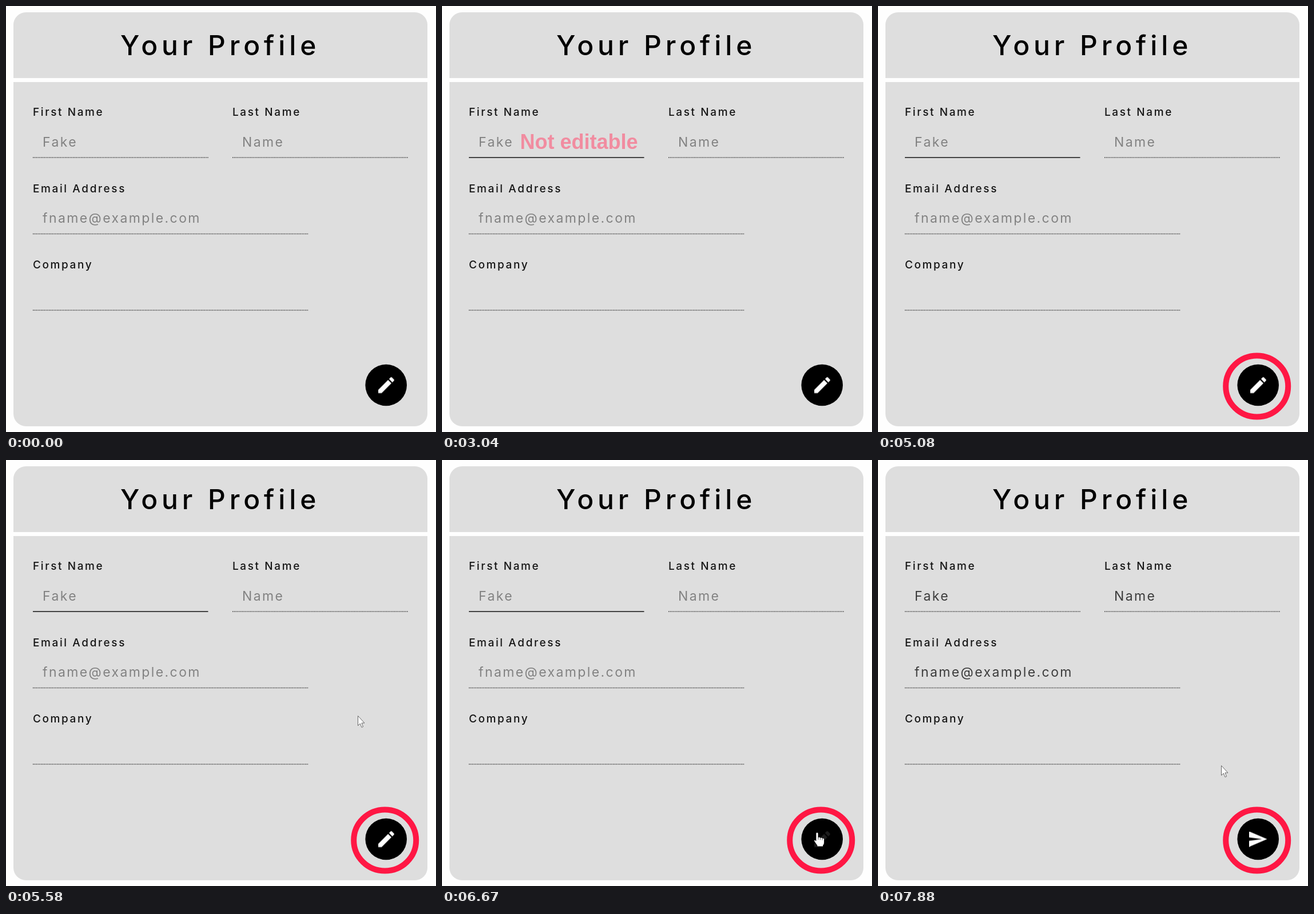
These frames come from a looping animation (752 px wide and 745 px high, 8 s). An HTML page:

```html
<!DOCTYPE html>
<html lang="en">
<head>
<meta charset="utf-8">
<title>Profile form</title>
<style>
  html, body { margin: 0; width: 100%; height: 100%; overflow: hidden; background: #fefefe; }
  svg { display: block; width: 752px; height: 745px; font-family: Inter, "Open Sans", sans-serif; }

  .card { fill: #dedede; }
  .title { font-size: 48px; font-weight: 500; letter-spacing: 6.9px; }
  .label { font-size: 19px; font-weight: 500; letter-spacing: 2.6px; fill: #151515; }
  .value { font-size: 23px; letter-spacing: 2.4px; fill: #828282; }
  .note { font: bold 36px "Liberation Sans", Arial, sans-serif; fill: #f18ca0; }
  .rule { stroke: #333; stroke-width: 1.6; stroke-dasharray: 1.4 1.4; }
  .focus { stroke: #444; stroke-width: 2; }
  .icon { fill: #fff; }

  /* Hard switches: every animated part shares one 8 s loop. */
  .switch { animation: 8s step-end infinite; }
  .note { animation-name: note; }
  .selection { animation-name: selection; }
  .focus { animation-name: focus; }
  .ring { animation-name: ring; }
  .edit { animation-name: edit; }
  .send { animation-name: send; }
  .arrow { animation-name: arrow; }
  .hand { animation-name: hand; }
  .value.switch { animation-name: enable; }
  .pointer { animation: move 8s linear infinite; }

  @keyframes note { 0%, 62% { opacity: 0 } 38% { opacity: 1 } }
  @keyframes selection { 0%, 58.875% { opacity: 0 } 51.625% { opacity: 1 } }
  @keyframes focus { 0%, 84.875% { opacity: 0 } 38% { opacity: 1 } }
  @keyframes ring { 0% { opacity: 0 } 62%, 100% { opacity: 1 } }
  @keyframes edit { 0% { opacity: 1 } 83.375% { opacity: .12 } 84.875%, 100% { opacity: 0 } }
  @keyframes send { 0% { opacity: 0 } 84.875% { opacity: .5 } 86.5%, 100% { opacity: 1 } }
  @keyframes enable { 0% { fill: #828282 } 84.875%, 100% { fill: #3c3c3c } }
  @keyframes arrow {
    0%, 31.75%, 79% { opacity: 0 }
    22.875%, 65.1%, 93.75%, 100% { opacity: 1 }
  }
  @keyframes hand { 0%, 93.75% { opacity: 0 } 79% { opacity: 1 } }

  @keyframes move {
    0%, 22.875% { transform: translate(500px, 610px); animation-timing-function: steps(2) }
    25.5% { transform: translate(187px, 457px); animation-timing-function: steps(4) }
    31.75% { transform: translate(110px, 240px); animation-timing-function: step-end }
    65.1% { transform: translate(330px, 265px); animation-timing-function: steps(3) }
    69.75% { transform: translate(615px, 447px); animation-timing-function: step-end }
    71.375% { transform: translate(622px, 462px); animation-timing-function: steps(5) }
    79%, 92.25% { transform: translate(656px, 651px); animation-timing-function: steps(4) }
    98.45%, 100% { transform: translate(600px, 534px) }
  }
</style>
</head>
<body>
<svg viewBox="0 0 752 745">
  <defs>
    <clipPath id="selected"><rect x="80" y="224" width="43" height="28"/></clipPath>
  </defs>

  <path class="card" d="M13 126V33a22 22 0 0 1 22-22H715a22 22 0 0 1 22 22V126Z"/>
  <path class="card" d="M13 133H737V713a22 22 0 0 1-22 22H35a22 22 0 0 1-22-22Z"/>
  <text class="title" x="200" y="86">Your Profile</text>

  <g class="label">
    <text x="47" y="192">First Name</text>
    <text x="396" y="192">Last Name</text>
    <text x="47" y="325.500">Email Address</text>
    <text x="47" y="459">Company</text>
  </g>

  <text class="value switch" x="64" y="246">Fake</text>
  <text class="value switch" x="413" y="246">Name</text>
  <text class="value switch" x="64" y="379">fname@example.com</text>

  <path class="rule" d="M47 265H354M396 265H703M47 398.500H529M47 532H529"/>
  <path class="focus switch" d="M47 265H353"/>

  <g class="selection switch" clip-path="url(#selected)">
    <rect x="80" y="224" width="43" height="28" fill="#3389f0"/>
    <text class="value" x="64" y="246" style="fill:#fff">Fake</text>
  </g>
  <text class="note switch" x="136.500" y="250">Not editable</text>

  <ellipse class="ring switch" cx="662.700" cy="665" rx="54.500" ry="53.500" fill="none" stroke="#ff1744" stroke-width="10"/>
  <circle cx="664.700" cy="663" r="36.300"/>
  <path class="icon edit switch" transform="translate(646.400 644.400) scale(1.55)"
    d="M3 17.250V21h3.750L17.810 9.940l-3.750-3.750zM20.710 7.040a1 1 0 0 0 0-1.410l-2.340-2.340a1 1 0 0 0-1.410 0l-1.830 1.830 3.750 3.750z"/>
  <path class="icon send switch" transform="translate(646 645) scale(1.5)" d="M2 21 23 12 2 3v7l15 2-15 2z"/>

  <g class="pointer">
    <path class="arrow switch" d="M.5.5V17.500L4.300 14 7 20.500 9.600 19.400 6.900 13H12Z"
      fill="#fff" stroke="#666" stroke-width="1"/>
    <g class="hand switch">
      <path d="M-2 1.500q2-2.500 4 0V9q2-1.500 3.500.5 2-1 3.500.8 3-.8 3.500 2V18q0 3-2 5v2H0v-2L-5 16q-1-3 1.500-2.500L-2 15Z"
        fill="#fff" stroke="#000" stroke-width=".8"/>
      <path d="M2 9v4M5.500 10v3.500M9 11v3" stroke="#222" stroke-width=".8"/>
    </g>
  </g>
</svg>
</body>
</html>
```
